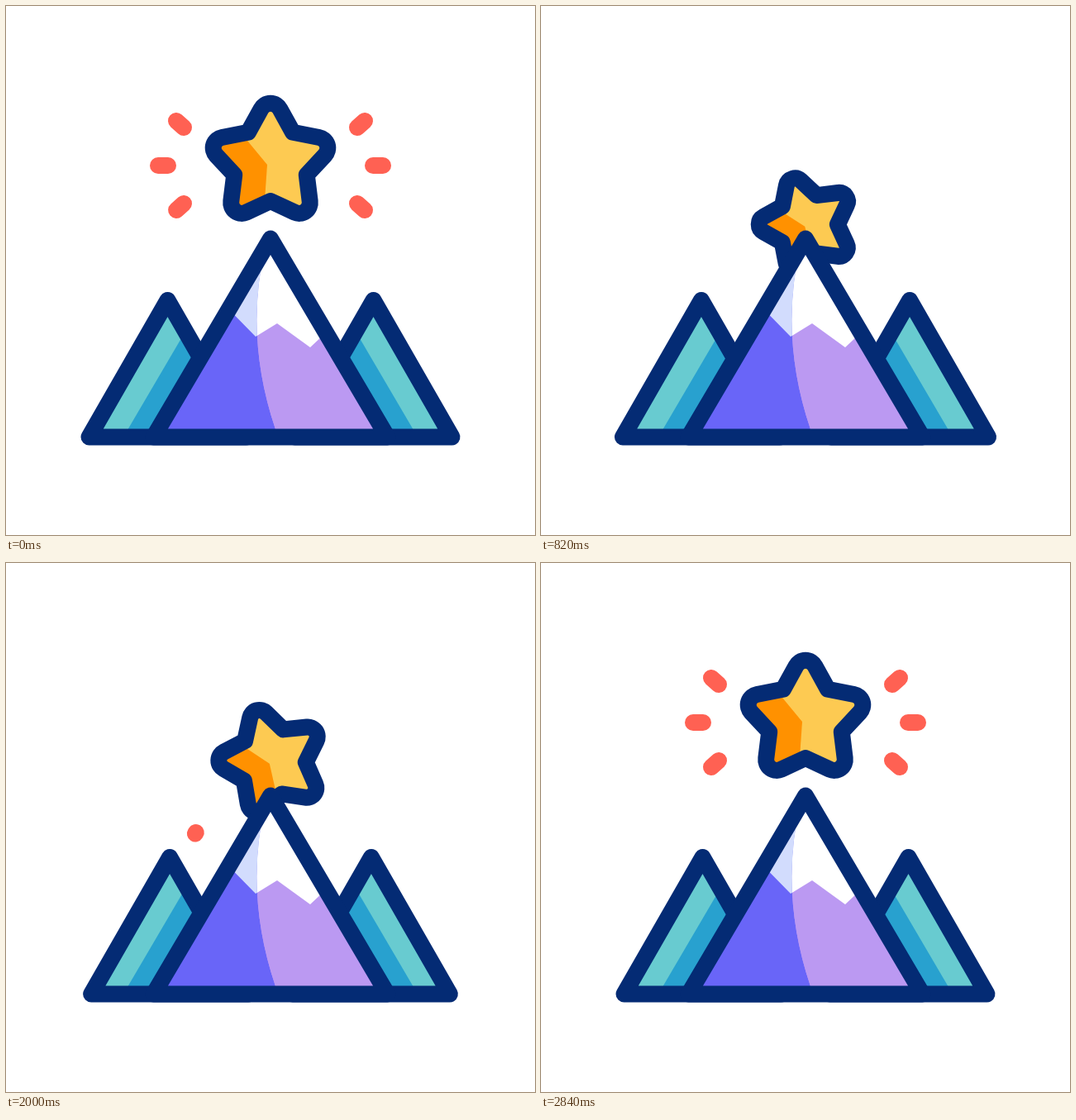
Write an HTML page with a canvas that moves like this. It is 640x640 px and loops after 3.02 s.

```html
<!DOCTYPE html>
<html lang="en">
<head>
<meta charset="utf-8">
<title>Mountain star</title>
<style>
  html, body { margin: 0; width: 100%; height: 100%; overflow: hidden; background: #fff; }
  canvas { display: block; width: 100vw; height: 100vh; }
</style>
</head>
<body>
<canvas id="stage" width="640" height="640"></canvas>
<script>
const ctx = document.getElementById('stage').getContext('2d');
const LOOP = 3020, BASE = 521.5, MID = 320;
const NAVY = '#042b74', RED = '#ff6153';

const REST = { y: 184, turn: 0, size: 1, spread: 124.5 };
const PEAK = { y: 149, turn: 20.5, size: 1.2, spread: 155 };
const HIDDEN = { y: 357, turn: -93, size: 0.45, spread: 0 };

// Outer and inner end of each ray, in the order they are drawn and erased
const RAYS = [
  [-114, 54, -105, 46], [-136, 0, -124, 0], [-114, -54, -105, -46],
  [114, -54, 105, -46], [136, 0, 124, 0], [114, 54, 105, 46]
];

const clamp = v => Math.max(0, Math.min(1, v));
const lerp = (a, b, k) => a + (b - a) * k;
const smooth = v => { const p = clamp(v); return p * p * (3 - 2 * p); };

function mix(a, b, move, turn = move, spread = move) {
  return {
    y: lerp(a.y, b.y, move),
    size: lerp(a.size, b.size, move),
    turn: lerp(a.turn, b.turn, turn),
    spread: lerp(a.spread, b.spread, spread)
  };
}

function poseAt(t) {
  if (t < 500) return mix(REST, PEAK, smooth(t / 500));
  if (t < 1720) {
    const p = clamp((t - 500) / 620);
    return mix(PEAK, HIDDEN, smooth(p), p ** 1.65, p ** 2.55);
  }
  if (t < 2360) {
    const p = (2360 - t) / 640;
    return mix(PEAK, HIDDEN, p ** 1.54, p ** 1.93, p ** 2.67);
  }
  return mix(PEAK, REST, smooth((t - 2360) / 480));
}

// Visible part of the chain of rays, as [start, end] from 0 to 1
function trimAt(t) {
  if (t < 900) return [t / 605, 1];
  if (t < 1900) return [(t - 1060) / 370, (t - 1000) / 300];
  return [0, (t - 1992) / 385];
}

function trace(points) {
  ctx.beginPath();
  points.forEach(([x, y]) => ctx.lineTo(x, y));
  ctx.closePath();
}

function fill(points, color) {
  trace(points);
  ctx.fillStyle = color;
  ctx.fill();
}

function outline() {
  ctx.lineWidth = 20;
  ctx.strokeStyle = NAVY;
  ctx.stroke();
}

function drawRays(start, end) {
  ctx.strokeStyle = RED;
  ctx.lineWidth = 20;
  RAYS.forEach(([x1, y1, x2, y2], i) => {
    const a = clamp(start * 6 - i), b = clamp(end * 6 - i);
    if (b <= a) return;
    ctx.beginPath();
    ctx.moveTo(lerp(x1, x2, a), lerp(y1, y2, a) + 9);
    ctx.lineTo(lerp(x1, x2, b), lerp(y1, y2, b) + 9);
    ctx.stroke();
  });
}

function starPath(size) {
  const at = (radius, step) => {
    const angle = (step * 36 - 90) * Math.PI / 180;
    return [radius * size * Math.cos(angle), radius * size * Math.sin(angle)];
  };
  ctx.beginPath();
  ctx.moveTo(...at(46, -1));
  for (let i = 0; i < 10; i += 2) {
    const notch = at(46, i + 1);
    ctx.arcTo(...at(86, i), ...notch, 13 * size);
    ctx.lineTo(...notch);
  }
  ctx.closePath();
}

function drawStar(size) {
  ctx.save();
  ctx.translate(0, 6);
  ctx.save();
  starPath(size);
  ctx.fillStyle = '#fdca52';
  ctx.fill();
  ctx.clip();
  fill([[-37, -38], [-4, 2], [-8, 60], [-90, 60], [-90, -38]]
    .map(([x, y]) => [x * size, y * size]), '#ff9100');
  ctx.restore();
  starPath(size);
  outline();
  ctx.restore();
}

function drawSide(dir, spread) {
  const x = MID + dir * spread;
  const shape = [[x, 356], [x + 95, BASE], [x - 95, BASE]];
  ctx.save();
  fill(shape, '#68cbd0');
  ctx.clip();
  fill([[172, BASE], [142, BASE], [242, 351], [320, 351], [320, BASE]]
    .map(([px, py]) => [MID + dir * (MID - px), py]), '#28a1cf');
  ctx.restore();
  trace(shape);
  outline();
}

function drawMain(t) {
  const bulge = smooth(1 - Math.abs(t - 1340) / (t < 1340 ? 260 : 240));
  const half = lerp(141.5, 157, bulge);
  const shape = [[MID, 281.5], [MID + half, BASE], [MID - half, BASE]];
  const left = 302 - 5 * bulge, right = 368 + 8 * bulge;
  const snow = [[left - 52, 347], [left, 400], [328, 384], [right, 413],
    [right + 32, 383], [right + 32, 270], [left - 52, 270]];
  ctx.save();
  fill(shape, '#bb99f2');
  ctx.clip();
  fill(snow, '#fff');
  // Shaded face
  ctx.beginPath();
  ctx.moveTo(314, 290);
  ctx.quadraticCurveTo(288, 400, 326, 512);
  ctx.lineTo(326, BASE);
  ctx.lineTo(140, BASE);
  ctx.lineTo(140, 270);
  ctx.lineTo(314, 270);
  ctx.clip();
  ctx.fillStyle = '#6965f8';
  ctx.fill();
  fill(snow, '#d2dcfd');
  ctx.restore();
  trace(shape);
  outline();
}

function draw(t) {
  const pose = poseAt(t);
  ctx.fillStyle = '#fff';
  ctx.fillRect(0, 0, 640, 640);
  ctx.lineCap = ctx.lineJoin = 'round';
  ctx.save();
  ctx.translate(MID, pose.y);
  ctx.rotate(pose.turn * Math.PI / 180);
  drawRays(...trimAt(t));
  drawStar(pose.size);
  ctx.restore();
  drawSide(-1, pose.spread);
  drawSide(1, pose.spread);
  drawMain(t);
}

const begin = performance.now();
function tick() {
  draw((performance.now() - begin) % LOOP);
  requestAnimationFrame(tick);
}
tick();
</script>
</body>
</html>
```
